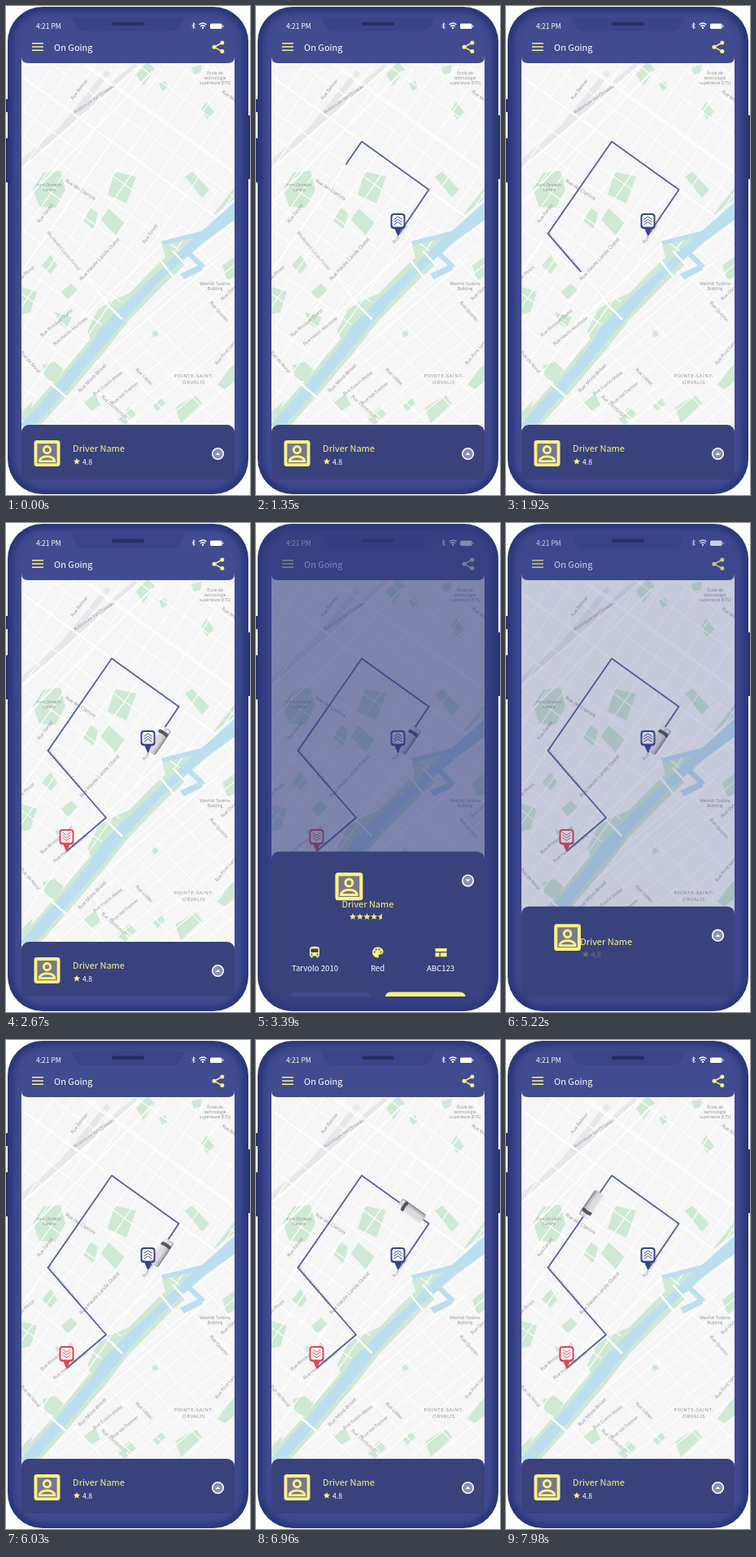
Animation, 300 px wide and 599 px high, one loop 8 s. Source, as an HTML page:

```html
<!DOCTYPE html>
<html lang="en">
<head>
<meta charset="utf-8">
<title>Ride in progress</title>
<style>
  html, body { margin: 0; width: 100%; height: 100%; overflow: hidden; background: #fff; }
  svg { display: block; width: 100vw; height: 100vh; }
  text { font-family: "Noto Sans CJK JP", "Noto Sans CJK SC", "Noto Sans CJK", Lato, sans-serif; }
  .mid { text-anchor: middle; }
  .label { font-family: "Open Sans", "Noto Sans", sans-serif; fill: #8f9093; text-anchor: middle; }
  .white { fill: #fff; }
  .gold { fill: #fdf283; }
  .goldLine { stroke: #fdf283; fill: none; }
  .green { fill: #cfe9d4; }
  .water { fill: #bcdff0; }
</style>
</head>
<body>
<svg viewBox="0 0 300 599" preserveAspectRatio="none">
  <defs>
    <clipPath id="mapClip"><rect x="19" y="60" width="262" height="465"/></clipPath>
    <clipPath id="screenClip"><rect x="19" y="70" width="262" height="510"/></clipPath>
    <clipPath id="bodyClip"><rect x="2" y="1" width="296" height="597" rx="43"/></clipPath>
    <clipPath id="north"><path d="M19 60H281V240L190 323 118 390 19 512Z"/></clipPath>
    <clipPath id="south"><path d="M281 262L190 336 128 408 35 515V525H281Z"/></clipPath>
    <filter id="soft"><feGaussianBlur stdDeviation="3"/></filter>
    <linearGradient id="busFill" x2="0" y2="1">
      <stop offset="0" stop-color="#efeff1"/><stop offset=".6" stop-color="#d0d0d4"/><stop offset="1" stop-color="#a6a6ac"/>
    </linearGradient>
    <path id="star" d="M0-4.2 1.2-1.4 4.1-1.2 1.9.8 2.6 3.6 0 2.1-2.6 3.6-1.9.8-4.1-1.2-1.2-1.4Z"/>
    <g id="pinShape">
      <path d="M-5-10L0 1 5-10Z"/><rect x="-9" y="-27" width="18" height="19" rx="4"/>
      <rect x="-7" y="-25" width="14" height="14.5" rx="2.5" fill="#fff"/>
    </g>
    <path id="chevrons" d="M-5-1.5L0-5 5-1.5M-5 1.8L0-1.7 5 1.8M-5 5.1L0 1.6 5 5.1" fill="none"/>
  </defs>

  <!-- phone body -->
  <path d="M0 114h4v16H0zM0 162h4v54H0zM296 134h4v78h-4z" fill="#26316c"/>
  <g clip-path="url(#bodyClip)">
    <rect width="300" height="599" fill="#293779"/>
    <rect x="9" y="7" width="282" height="585" rx="38" fill="#404a90" filter="url(#soft)"/>
  </g>

  <g clip-path="url(#mapClip)">
    <rect x="19" y="60" width="262" height="465" fill="#f6f6f6"/>
    <path d="M15 196L88 134 168 66M56 166L126 80" stroke="#e7e8eb" stroke-width="7" fill="none"/>
    <path class="green" d="M160 84L174 68 183 77 169 98ZM228 75L241 72 239 82 231 84ZM246 117L256 130 247 139 240 127ZM188 95L196 92 199 100 192 104Z
      M220 209L229 203 250 225 241 235ZM134 203L160 209 148 242 125 231ZM95 263L104 247 113 254 108 274ZM116 261L125 247 146 266 135 281Z
      M46 204L67 202 73 225 61 247 41 246 33 224ZM44 318L55 305 63 318 55 328ZM68 350L80 340 88 348 75 360ZM19 344L38 350 30 375 19 378Z
      M60 375L81 381 75 394 66 390ZM179 397L185 398 188 403 181 406ZM100 398L113 372 128 362 158 349 145 364 122 386 106 412Z
      M45 440L60 436 76 450 65 462 48 457Z
      M19 498L33 484 27 505 19 513ZM94 484L110 475 116 489 105 496ZM136 505L152 491 160 500 146 513ZM180 489L191 480 196 487 186 496Z
      M208 492L233 476 241 487 215 511ZM260 464L281 436V462L270 470ZM266 318L281 307V331L272 336ZM246 267L281 222V236L250 261Z
      M191 289L244 276 214 299 198 316Z"/>
    <g id="streets" stroke="#fff" fill="none"></g>
    <path d="M27 514L68 468 114 414 142 378 190 329 214 307" stroke="#cfe9d4" stroke-width="23" fill="none"/>
    <path class="water" d="M19 512L60 466 100 420 118 393 136 373 190 323 215 298 245 272 281 240V262L245 288 213 316 190 336 150 380 128 407 100 440 75 470 35 515H19Z
      M191 288L243 275 236 283 193 293ZM216 299L222 296 245 318 240 322ZM214 328L238 317 242 323 219 335Z"/>
    <path d="M190 312L206 332M205 300L222 318M120 361L143 384M52 460L74 479" stroke="#fff" stroke-width="2.5"/>
    <g id="labels"></g>
    <g id="trip">
      <path id="route" d="M174.5 281L212.500 225 130 166 51.500 279 123 361 74.500 402" fill="none" stroke="#5a639f" stroke-width="1.900" stroke-linejoin="round"/>
      <g id="bus">
        <rect x="-18" y="-7" width="36" height="14" rx="2.5" fill="url(#busFill)"/>
        <path d="M-15-4.5H5V2H-15Z" fill="#dcdce0"/>
        <path d="M8-6.5H12Q14 0 12 6.5H8Q9.5 0 8-6.5Z" fill="#54555d"/>
        <path d="M-16 6H7" stroke="#8c8c93" stroke-width="1.3"/>
        <path d="M15-5V-2M15 2V5" stroke="#fff" stroke-width="2"/>
      </g>
      <g id="pickup" fill="#36428a">
        <use href="#pinShape"/><use href="#chevrons" y="-18" stroke="#36428a"/>
      </g>
      <g id="dropoff" fill="#e04853">
        <use href="#pinShape"/><use href="#chevrons" transform="translate(0 -18) scale(1 -1)" stroke="#e04853"/>
      </g>
    </g>
  </g>

  <!-- header -->
  <path d="M19 48Q19 14 49 14H251Q281 14 281 48V62Q281 70 273 70H27Q19 70 19 62Z" fill="#414b90"/>
  <path d="M76 14Q82 14 83 19 85 31 98 31H202Q215 31 217 19 218 14 224 14Z" fill="#3a448a"/>
  <rect x="130" y="19.5" width="40" height="4.5" rx="2.2" fill="#272f62"/>
  <text x="37" y="27.5" font-size="8.5" font-weight="500" class="white">4:21 PM</text>
  <path d="M228.5 22.5L232.5 26 230.5 28V20.5L232.5 22.5 228.5 26" stroke="#fff" stroke-width=".8" fill="none"/>
  <path d="M237.5 22.8Q242 19 246.5 22.8M239.2 25Q242 22.6 244.8 25" stroke="#fff" stroke-width="1.4" fill="none"/>
  <circle cx="242" cy="26.8" r="1.2" class="white"/>
  <rect x="251" y="21.5" width="14.5" height="6.5" rx="1.5" class="white"/>
  <path d="M266.8 23.5V26" stroke="#fff"/>
  <path d="M32 45.7H46M32 50H46M32 54.3H46" class="goldLine" stroke-width="1.5"/>
  <text x="59" y="55" font-size="11" font-weight="500" class="white">On Going</text>
  <path d="M265.8 45L256 50.3 265.8 55.6" class="goldLine" stroke-width="1.5"/>
  <g class="gold"><circle cx="265.8" cy="45" r="2.5"/><circle cx="256" cy="50.3" r="2.5"/><circle cx="265.8" cy="55.6" r="2.5"/></g>

  <rect id="shade" x="2" y="1" width="296" height="597" rx="43" fill="#303a7c"/>

  <!-- bottom sheet -->
  <g clip-path="url(#screenClip)">
    <g id="sheet">
      <rect x="19" width="262" height="260" rx="9" fill="#39427c"/>
      <circle cx="260.5" cy="35.5" r="6.8" fill="#8a90b8" stroke="#fff" stroke-width="1.6"/>
      <path id="arrow" d="M-3 1.5L0-1.7 3 1.5Z" class="white"/>
      <g class="gold">
        <path fill-rule="evenodd" d="M67 117Q72 115.5 77 117 78 118 78 120V128H76.5V130H74.5V128H69.5V130H67.5V128H66V120Q66 118 67 117ZM67.5 119V123.5H76.5V119ZM68.5 125A1 1 0 1 0 68.5 127 1 1 0 1 0 68.5 125ZM75.5 125A1 1 0 1 0 75.5 127 1 1 0 1 0 75.5 125Z"/>
        <path d="M149.500 117C145.500 117 143 120 143 123.500S146 130 149.500 130C151 130 151.500 128.800 150.800 127.800 150.300 126.800 151 126 152 126H153C155 126 156.500 124.500 156.500 122.500 156.500 119.500 153.500 117 149.500 117Z"/>
        <path d="M220.500 118.500H234.500V122.500H220.500ZM220.500 123.700H225.500V128.700H220.500ZM226.700 123.700H234.500V128.700H226.700Z"/>
      </g>
      <g fill="#39427c"><circle cx="145.8" cy="123" r="1"/><circle cx="147.6" cy="120" r="1"/><circle cx="151.4" cy="120" r="1"/><circle cx="153.6" cy="123" r="1"/></g>
      <g font-size="9.6" font-weight="500" class="white mid">
        <text x="72.5" y="146.5">Tarvolo 2010</text><text x="149.5" y="146.5">Red</text><text x="227" y="146.5">ABC123</text>
      </g>
      <path d="M42 208V180Q42 172 50 172H133Q141 172 141 180V208Z" fill="#434d8e"/>
      <path d="M158.500 208V180Q158.500 172 166.500 172H250Q258 172 258 180V208Z" class="gold"/>
      <g font-size="12.8" font-weight="700">
        <text x="91.5" y="195.8" class="white mid">CANCEL</text>
        <text x="180" y="195.8" fill="#343e78">CALL</text>
      </g>
      <path transform="translate(217.5 180.5) scale(.78)" fill="none" stroke="#343e78" stroke-width="2" stroke-linejoin="round" d="M4 4H8L9 8.5 6.6 10.800Q9 15 13.200 17.400L15.500 15 20 16V20Q12 20 8 16T4 4Z"/>
    </g>
    <g id="avatar">
      <rect x="-14.5" y="-14.5" width="29" height="29" rx="1.5" fill="#777a8c" stroke="#fdf283" stroke-width="4"/>
      <circle cy="-4.500" r="4.300" class="goldLine" stroke-width="3"/>
      <path d="M-9.500 10V8.500Q-7 4 0 4T9.500 8.500V10Z" class="goldLine" stroke-width="2.800"/>
    </g>
    <text id="driver" font-size="11" font-weight="500" class="gold mid">Driver Name</text>
    <g id="rating"><use href="#star" class="gold"/><text x="7" y="3.5" font-size="8.7" font-weight="500" class="white">4.8</text></g>
    <g id="stars" class="gold"></g>
  </g>
</svg>

<script>
const LOOP = 8000;
const $ = id => document.getElementById(id);
const set = (id, name, value) => $(id).setAttribute(name, value);
const place = (id, x, y, extra = '') => set(id, 'transform', `translate(${x} ${y}) ${extra}`);
const clamp = v => Math.min(1, Math.max(0, v));
const ramp = (t, start, duration) => clamp((t - start) / duration);
const mix = (a, b, p) => a + (b - a) * p;
const easeOut = u => 1 - (1 - u) ** 3;

// Parallel streets around a point, at a given angle and spacing.
function streetFamily(clip, x, y, angle, gap) {
  let d = '';
  for (let i = -14; i <= 14; i++) d += `M-420 ${i * gap + 3 * Math.sin(i * 2.3)}h840`;
  return `<g clip-path="url(#${clip})"><path transform="translate(${x} ${y}) rotate(${angle})" stroke-width="1.2" d="${d}"/></g>`;
}
$('streets').innerHTML =
  streetFamily('north', 130, 166, -55, 23) + streetFamily('north', 130, 166, 36, 31) +
  streetFamily('south', 160, 460, -39, 19) + streetFamily('south', 160, 460, 46, 34) +
  '<path stroke-width="2.2" d="M19 86L281 275M130 166L19 325M51 279L123 361M19 242L180 80M74 402L215 270M19 200L165 72M96 72L281 205M90 455L260 310M110 470L240 590"/>';

// text, centre x, centre y, angle, size
const labels = [
  ['Rue Belmar', 90, 102, -52], ['Autoroute Val-Ormeau', 108, 114, -34],
  ['Rue des Clairons', 92, 225, 33], ['Rue Fardel', 48, 254, -52],
  ['Boulevard Lucas-Fontel', 71, 300, 50], ['Rue Haute-Lande Ouest', 115, 310, -47, 6.2],
  ['Rue Torvel', 177, 279, -54], ['Rue Plinot', 24, 328, -42],
  ['Rue Bosquel Ouest', 62, 388, -40], ['Rue Haute-Morlinde', 79, 398, -39],
  ['Rue de Noral', 30, 436, 49], ['Rue Mont-Brivel', 106, 456, -45, 6.2],
  ['Rue Evarin-Molet', 125, 462, -38], ['Rue Val-Tremier', 146, 474, -39],
  ['Rue Dombrevin', 133, 491, 42], ['Rue Lisbec', 170, 454, 45],
  ['Rue Quorlin', 262, 374, 49], ['Rue Pont Larsel', 271, 423, -50],
  ['Rue Mirtal', 277, 112, 36], ['Rue Ostel', 274, 351, -43],
  ['Parc Ormelin', 53, 219, 0, 5], ['Centre', 53, 225, 0, 5],
  ['École de', 257, 82, 0, 5], ['technologie', 257, 88, 0, 5], ['supérieure (ÉTS)', 257, 94, 0, 5],
  ['Westhill Turbine', 257, 340, 0, 5], ['Building', 257, 346, 0, 5],
  ['POINTE-SAINT-', 231, 453, 0, 6], ['ORVALIS', 231, 461, 0, 6]
];
$('labels').innerHTML = labels.map(([text, x, y, angle, size = 5.6]) =>
  `<text class="label" font-size="${size}" letter-spacing="${size === 6 ? .6 : 0}" transform="translate(${x} ${y}) rotate(${angle})" y="2">${text}</text>`).join('');

$('stars').innerHTML = [-2, -1, 0, 1].map(i => `<use href="#star" x="${i * 8.7}"/>`).join('') +
  '<path transform="translate(17.4 0)" d="M1-4.2V2.4L-2.6 3.6-1.9.8-4.1-1.2-1.2-1.4Z"/>';

const route = $('route');
const routeLength = route.getTotalLength();
const BUS_START = 18;

function drawBus(t) {
  const drive = Math.max(0, t - 5790) / 1000;
  const distance = BUS_START + 60 * drive ** 1.5;
  const at = route.getPointAtLength(distance);
  const back = route.getPointAtLength(distance - 9), front = route.getPointAtLength(distance + 9);
  const angle = Math.atan2(front.y - back.y, front.x - back.x) * 180 / Math.PI;
  // The parked bus stands slightly beside the line.
  const side = 3 * (1 - clamp(drive / 1.2));
  place('bus', at.x + side, at.y, `rotate(${angle})`);
  set('bus', 'opacity', ramp(t, 2400, 200));
}

function drawSheet(p) {
  place('sheet', 0, mix(513, 341, p));
  place('arrow', 260.5, 35.5, `scale(1 ${p < .3 ? 1 : -1})`);
  place('avatar', mix(50.5, 150, p), mix(548, 388, p), `scale(${mix(.97, 1.06, p)})`);
  place('driver', mix(114, 150.5, p), mix(546, 429.5, p));
  place('rating', mix(87, 130, p), mix(558, 440, p));
  place('stars', mix(113, 149.5, p), mix(558, 440, p));
  set('rating', 'opacity', clamp(1 - 3 * p));
  set('stars', 'opacity', clamp(3 * p - 1));
  set('shade', 'opacity', .7 * Math.min(1, p * 1.35));
}

function draw(t) {
  const drawn = ramp(t, 650, 1650) * routeLength;
  set('route', 'stroke-dasharray', `${drawn} ${routeLength + 10}`);
  place('pickup', 174.5, 281, `scale(${easeOut(ramp(t, 350, 300))})`);
  place('dropoff', 74.5, 402, `scale(${easeOut(ramp(t, 2250, 250))})`);
  drawBus(t);
  drawSheet(easeOut(ramp(t, 3217, 600)) - easeOut(ramp(t, 5000, 600)));
}

const begin = performance.now();
function tick() {
  draw((performance.now() - begin) % LOOP);
  requestAnimationFrame(tick);
}
tick();
</script>
</body>
</html>
```
